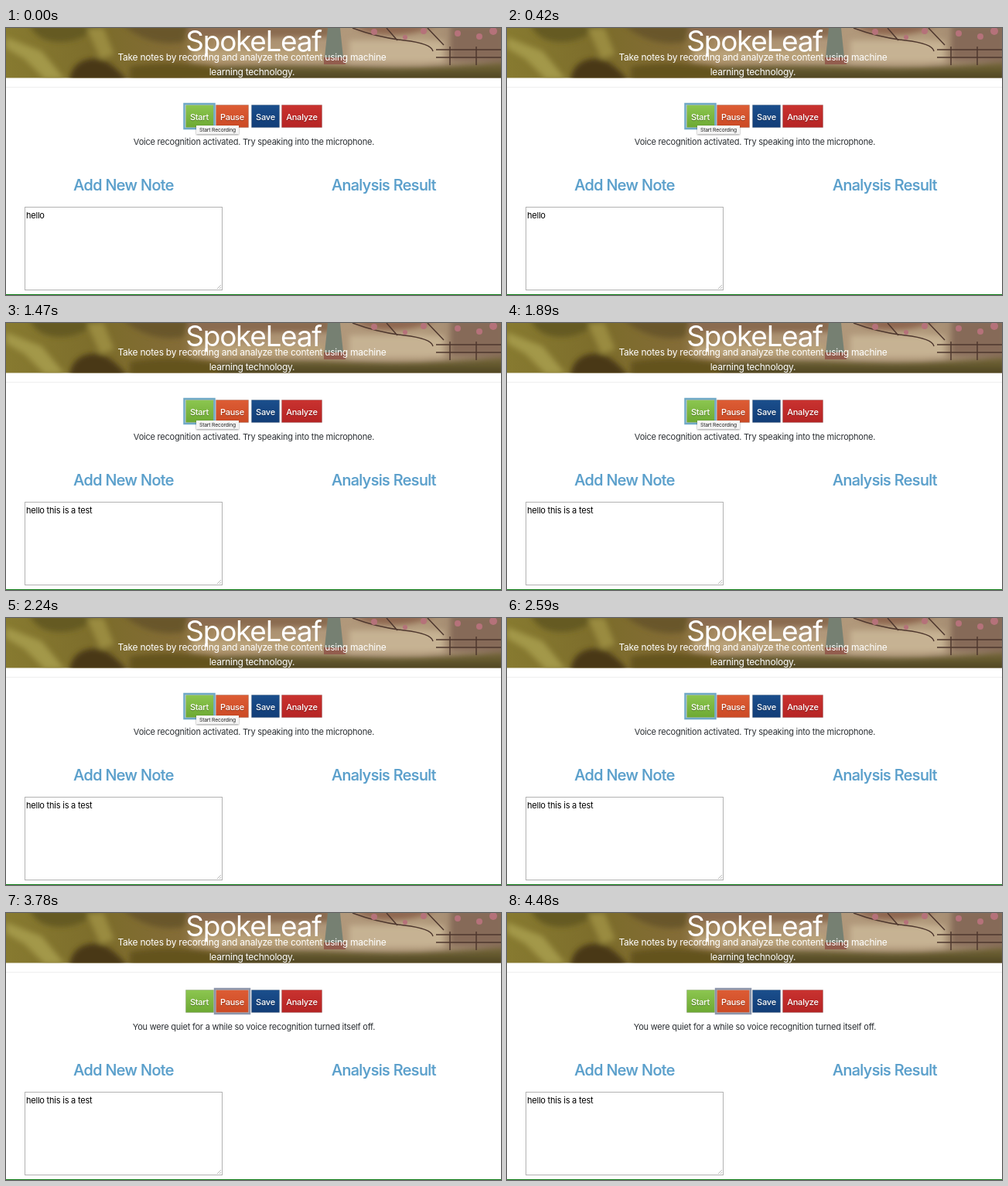
Recreate the animation shown at these times as an HTML page. Size 640 px wide and 345 px high, loop 4.55 s.

```html
<!DOCTYPE html>
<html lang="en">
<head>
<meta charset="utf-8">
<title>Voice notes</title>
<style>
  html, body { margin: 0; width: 100%; height: 100%; overflow: hidden; background: #fff; }
  svg { display: block; width: 640px; height: 345px; }
  text { font: 400 11px Inter, "Open Sans", sans-serif; letter-spacing: -.02em; white-space: pre; }
  .mid { text-anchor: middle; }
  .title { font-size: 37px; letter-spacing: -.035em; fill: #fff; }
  .lead { font-size: 12px; fill: #fff; }
  .heading { font-size: 19.8px; font-weight: 500; letter-spacing: -.03em; fill: #5a9fcb; stroke: #5a9fcb; stroke-width: .2; }
  .button { stroke: #000; stroke-opacity: .14; }
  .label { font-weight: 500; fill: #fff; text-shadow: 0 1px 1px rgba(0, 0, 0, .3); }
  .status { fill: #2b2f33; }
  .hint { font-size: 6.7px; fill: #222; }
  .ring { fill: none; stroke-width: 2.5; }

  .heard, .tip, .listening, .paused { animation: 4550ms step-end infinite; }
  .heard { animation-name: heard; }
  .tip { animation-name: tip; }
  .listening { animation-name: listening; }
  .paused { animation-name: paused; }
  @keyframes heard { 0% { fill-opacity: 0 } 30.77%, 100% { fill-opacity: 1 } }
  @keyframes tip { 0% { opacity: 1 } 50%, 100% { opacity: 0 } }
  @keyframes listening { 0% { opacity: 1 } 76.92%, 100% { opacity: 0 } }
  @keyframes paused { 0% { opacity: 0 } 76.92%, 100% { opacity: 1 } }
</style>
</head>
<body>
<svg viewBox="0 0 640 345">
  <defs>
    <clipPath id="banner"><rect width="640" height="64.5"/></clipPath>
    <filter id="soft" x="-20%" y="-20%" width="140%" height="140%"><feGaussianBlur stdDeviation="3.5"/></filter>
    <filter id="shade"><feGaussianBlur stdDeviation="1"/></filter>
    <linearGradient id="garden">
      <stop offset="0" stop-color="#877a30"/>
      <stop offset=".2" stop-color="#7c6c2b"/>
      <stop offset=".35" stop-color="#846c37"/>
      <stop offset=".42" stop-color="#a68a62"/>
      <stop offset=".6" stop-color="#b0977a"/>
      <stop offset=".84" stop-color="#b29a7c"/>
      <stop offset="1" stop-color="#8e7560"/>
    </linearGradient>
    <linearGradient id="hedge" x2="0" y2="1">
      <stop stop-color="#77693a"/><stop offset="1" stop-color="#3c3517"/>
    </linearGradient>
    <linearGradient id="green" x2="0" y2="1"><stop stop-color="#8cc650"/><stop offset="1" stop-color="#6da933"/></linearGradient>
    <linearGradient id="orange" x2="0" y2="1"><stop stop-color="#dd5c34"/><stop offset="1" stop-color="#cb4a25"/></linearGradient>
    <linearGradient id="blue" x2="0" y2="1"><stop stop-color="#1a4e8c"/><stop offset="1" stop-color="#123d77"/></linearGradient>
    <linearGradient id="red" x2="0" y2="1"><stop stop-color="#c9322f"/><stop offset="1" stop-color="#b52424"/></linearGradient>
  </defs>

  <g clip-path="url(#banner)">
    <rect width="640" height="65" fill="url(#garden)"/>
    <g filter="url(#soft)">
      <path d="M30-5H120Q100 18 70 18T30-5Z" fill="#655a20"/>
      <path d="M0 12L46 30 76 66H50L24 40 0 26Z" fill="#a39848"/>
      <path d="M82 70Q84 44 108 40T158 70Z" fill="#493917"/>
      <path d="M104 0L126 0 140 34 122 40Z" fill="#9a8b40"/>
      <path d="M150-5H236L230 18Q186 26 150-5Z" fill="#69572a"/>
      <path d="M160 50Q210 40 285 52V70H160Z" fill="#64521f"/>
      <path d="M236-5H420V12H236Z" fill="#8a6a50"/>
      <path d="M240 28H410V42H240Z" fill="#b9a279"/>
      <path d="M444 16H566V44H444Z" fill="#c6b293"/>
      <path d="M450-5H560Q530 10 494 9T450-5Z" fill="#8e6650"/>
      <path d="M575-5H645V42H575Z" fill="#866a58"/>
      <path d="M270 50Q360 46 450 50T645 44V75H280Z" fill="url(#hedge)"/>
    </g>
    <path d="M416 0H432L436 38H412Z" fill="#768072"/>
    <path d="M411 38H439V47H411Z" fill="#935d4e"/>
    <g fill="none" stroke="#4e372e" stroke-width="1.5">
      <path d="M448 0Q480 12 515 16T552 30M492 0L506 16M545 0L566 22"/>
      <path d="M556 28H640M556 38H640M574 24V48M608 24V48"/>
    </g>
    <g fill="#b5727a">
      <circle cx="476" cy="5" r="4"/><circle cx="516" cy="12" r="3"/><circle cx="540" cy="4" r="4"/>
      <circle cx="584" cy="7" r="4"/><circle cx="612" cy="11" r="4"/><circle cx="630" cy="4" r="5"/>
    </g>
  </g>
  <text class="title mid" x="320" y="30">SpokeLeaf</text>
  <text class="lead mid" x="318" y="42">Take notes by recording and analyze the content using machine</text>
  <text class="lead mid" x="318" y="61">learning technology.</text>
  <path d="M0 76.5H640" stroke="#eee"/>

  <rect class="button" x="232.5" y="99.5" width="36" height="29" fill="url(#green)"/>
  <rect class="button" x="271.5" y="99.5" width="42" height="29" fill="url(#orange)"/>
  <rect class="button" x="317.5" y="99.5" width="36" height="29" fill="url(#blue)"/>
  <rect class="button" x="356.5" y="99.5" width="52" height="29" fill="url(#red)"/>
  <rect class="ring listening" x="230.5" y="98" width="39" height="32" stroke="#6fa9c6"/>
  <rect class="ring paused" x="270" y="98" width="45" height="32" stroke="#8c95aa"/>
  <text class="label mid" x="250" y="118.5">Start</text>
  <text class="label mid" x="292.5" y="118.5">Pause</text>
  <text class="label mid" x="335.5" y="118.5">Save</text>
  <text class="label mid" x="382.5" y="118.5">Analyze</text>

  <text class="status mid listening" x="320.5" y="150.5">Voice recognition activated. Try speaking into the microphone.</text>
  <text class="status mid paused" x="320.5" y="150.5">You were quiet for a while so voice recognition turned itself off.</text>

  <g class="tip">
    <rect x="246" y="127" width="55" height="11" fill="#000" opacity=".4" filter="url(#shade)"/>
    <rect x="246" y="126" width="55" height="11" fill="#f4f4f4"/>
    <text class="hint mid" x="273.5" y="134">Start Recording</text>
  </g>

  <text class="heading mid" x="152" y="209.5">Add New Note</text>
  <text class="heading mid" x="488.5" y="209.5">Analysis Result</text>

  <rect x="24.5" y="231.5" width="255" height="107" fill="#fff" stroke="#b2b2b2"/>
  <path d="M273 337L278 332M276 337L278 335" stroke="#aaa" stroke-width=".8"/>
  <text x="26" y="245.5">hello<tspan class="heard"> this is a test</tspan></text>

  <rect y="344" width="640" height="1" fill="#0b7a12"/>
</svg>
</body>
</html>
```
